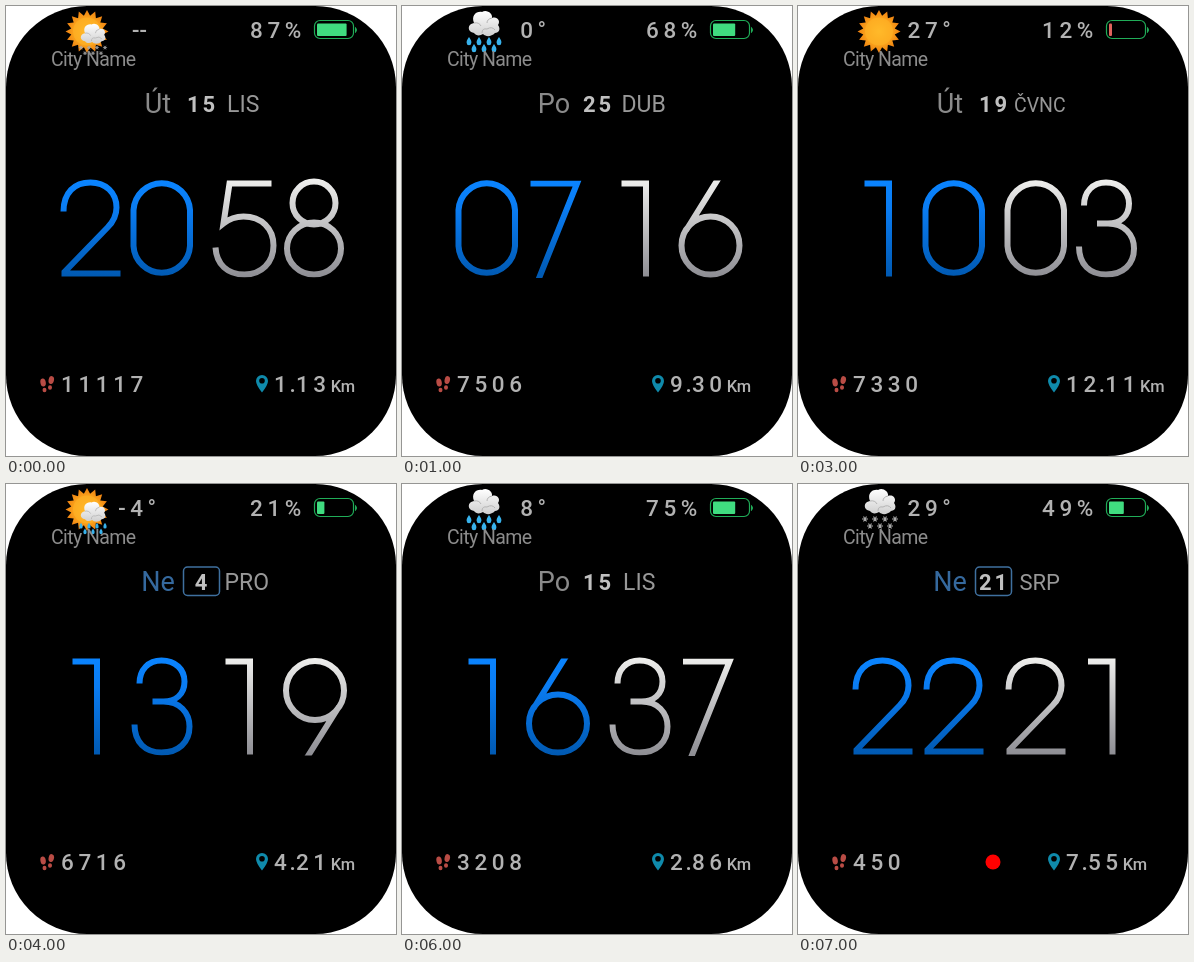
These frames come from a looping animation (390x450 px, 8000 ms). An HTML page:

```html
<!DOCTYPE html>
<html lang="cs">
<head>
<meta charset="utf-8">
<title>Watch face</title>
<style>
  html, body { margin: 0; width: 100%; height: 100%; overflow: hidden; background: #fff; }
  svg { display: block; width: 390px; height: 450px; font-family: Roboto, sans-serif; fill: #b2b2b2; }
  .num { font-size: 22.5px; font-weight: 500; letter-spacing: 4.6px; }
  .dot { letter-spacing: .2px; }
  .unit { font-size: 16.5px; letter-spacing: -.3px; }
  .mid { text-anchor: middle; }
  .city { font-size: 19.5px; letter-spacing: -.6px; fill: #8c8c8c; }
  .week { font-size: 27px; fill: #8a8a8a; }
  .day { font-size: 22px; font-weight: 700; letter-spacing: 3px; fill: #c0c0c0; }
  .month { fill: #989898; }
  .sunday { fill: #35699e; }
  .big { fill: none; stroke-width: 6; }
</style>
</head>
<body>
<svg viewBox="0 0 390 450">
  <defs>
    <linearGradient id="blue" gradientUnits="userSpaceOnUse" x1="0" y1="0" x2="0" y2="100">
      <stop stop-color="#0a84ff"/><stop offset=".3" stop-color="#0a7cf2"/><stop offset="1" stop-color="#0058b0"/>
    </linearGradient>
    <linearGradient id="white" gradientUnits="userSpaceOnUse" x1="0" y1="0" x2="0" y2="100">
      <stop stop-color="#f0f0ee"/><stop offset="1" stop-color="#8c8c92"/>
    </linearGradient>
    <radialGradient id="sunFill">
      <stop stop-color="#ffc02c"/><stop offset=".6" stop-color="#fba41c"/><stop offset="1" stop-color="#ee7f10"/>
    </radialGradient>
    <linearGradient id="cloudFill" x1="0" y1="0" x2="0" y2="1">
      <stop stop-color="#fff"/><stop offset="1" stop-color="#cfcfcf"/>
    </linearGradient>
    <clipPath id="trim"><rect x="-5" y="-1" width="75" height="100"/></clipPath>
    <clipPath id="flat"><rect x="-5" y="2" width="75" height="97.500"/></clipPath>
    <g id="cloud">
      <path d="M-10 9C-17 8-17 0-10-1C-13-8-8-13-2-12C3-15 9-10 8-6C13-8 17-3 14 1C17 5 15 9 11 9C7 13 2 13-1 10C-4 12-8 12-10 9Z" fill="url(#cloudFill)"/>
      <path d="M-10-1Q-5-2-3 2M8-6Q3-5 3-1M-2 9Q-2 4 3 5Q8 2 11 6" fill="none" stroke="#b4b4b4"/>
    </g>
    <path id="drop" d="M0-4Q3 0 2.300 2A2.300 2.300 0 0 1-2.300 2Q-3 0 0-4Z" fill="#38b2ec"/>
    <path id="flake" d="M-3 0H3M-1.500-2.600L1.500 2.600M1.500-2.600L-1.500 2.600" stroke="#a9a9a9" stroke-width="1.100"/>
  </defs>
  <rect width="390" height="450" rx="81" fill="#000"/>
  <g fill="#b94c45">
    <ellipse cx="37" cy="376.500" rx="2.700" ry="4" transform="rotate(-10 37 376)"/>
    <ellipse cx="38.500" cy="384" rx="2" ry="2.200"/>
    <ellipse cx="45.300" cy="374" rx="2.700" ry="4" transform="rotate(12 45 374)"/>
    <ellipse cx="44" cy="381.500" rx="2" ry="2.200"/>
  </g>
  <path d="M256 386.500Q250 379 250 375A6 6 0 0 1 262 375Q262 379 256 386.500ZM256 372A2.800 2.800 0 1 0 256 377.600A2.800 2.800 0 1 0 256 372Z" fill="#0f8aab" fill-rule="evenodd"/>
  <rect x="308.500" y="14.500" width="39" height="18" rx="5.500" fill="none" stroke="#20ad58" stroke-width="1.200"/>
  <path d="M349.500 21.500Q351.500 24 349.500 26.500Z" fill="#20ad58" stroke="#20ad58"/>
  <g id="face"></g>
  <text class="city" x="45" y="60">City Name</text>
</svg>
<script>
const STEP = 1000;

const glyphs = {
  0: 'M3 31.500A28.300 28.500 0 0 1 59.500 31.500V67.500A28.300 28.500 0 0 1 3 67.500Z',
  1: 'M13 5H37.500V98',
  2: 'M4 33C4 14 15 4 31 4C46 4 57 14 57 29C57 37 54 43 48 49L5 93.500V95H61',
  3: 'M9 27C9 13 18 4 31 4C45 4 54 13 54 25C54 38 45 45 33 45H22M33 45C49 45 59 56 59 70C59 86 48 96 31 96C15 96 4 86 4 68',
  5: 'M59 5H17L11 45C16 41 23 38 31 38C49 38 61 50 61 67C61 84 49 96 32 96C15 96 4 86 3 69',
  6: 'M40 -1L7 52M2.500 67A29 29 0 1 1 60.500 67A29 29 0 1 1 2.500 67',
  7: 'M4 5H50.500L12 101',
  8: 'M9.500 24.500A21 21 0 1 1 52.500 24.500A21 21 0 1 1 9.500 24.500M4 70A27 26 0 1 1 58 70A27 26 0 1 1 4 70',
  9: 'M24 101L56 50M3 34A29 29.500 0 1 1 61 34A29 29.500 0 1 1 3 34'
};
const slots = [53.5, 124.5, 206.5, 277];

// time, weekday, day, [month, x, size], temperature, battery, steps, distance, weather, link lost
const states = [
  ['2058', 'Út', 15, ['LIS', 221, 23], '--', 87, 11117, '1.13', 'sun snow'],
  ['0716', 'Po', 25, ['DUB', 219.5, 23], '0°', 68, 7506, '9.30', 'rain'],
  ['0852', 'St', 12, ['SRP', 221.5, 22], '16°', 35, 8264, '6.72', 'sun rain'],
  ['1003', 'Út', 19, ['ČVNC', 216, 19.5], '27°', 12, 7330, '12.11', 'sun'],
  ['1319', 'Ne', 4, ['PRO', 218.5, 23], '-4°', 21, 6716, '4.21', 'sun rain'],
  ['0111', 'Čt', 4, ['SRP', 221.5, 22], '19°', 62, 5922, '4.52', 'sleet', true],
  ['1637', 'Po', 15, ['LIS', 221, 23], '8°', 75, 3208, '2.86', 'rain'],
  ['2221', 'Ne', 21, ['SRP', 221.5, 22], '29°', 49, 450, '7.55', 'snow', true]
];

const text = (cls, x, y, s, extra = '') => `<text class="${cls}" x="${x}" y="${y}" ${extra}>${s}</text>`;
const use = (id, x, y, k = 1) => `<use href="#${id}" transform="translate(${x} ${y}) scale(${k})"/>`;

function sun() {
  const pts = Array.from({ length: 32 }, (_, i) => {
    const a = i * Math.PI / 16, r = i % 2 ? 16 : 21.5;
    return `${(81 + r * Math.sin(a)).toFixed(1)},${(25.5 - r * Math.cos(a)).toFixed(1)}`;
  });
  return `<polygon points="${pts.join(' ')}" fill="url(#sunFill)"/>` +
    '<circle cx="81" cy="25.5" r="14" fill="#ffb428" fill-opacity=".55"/>';
}

function weather(kind) {
  const sunny = kind.startsWith('sun'), fall = kind.split(' ').pop();
  let out = sunny ? sun() : '';
  if (fall === 'sun') return out;
  const [cx, cy, k] = sunny ? [87, 28, .8] : [82, 18, 1];
  for (let i = 0; i < 7; i++) {
    const low = i > 3;
    const x = cx + k * (low ? (i - 5) * 10 : (i - 1.5) * 10);
    const y = cy + k * (low ? 24 : 17);
    const id = fall === 'rain' || (fall === 'sleet' && i % 2 === 0) ? 'drop' : 'flake';
    out += use(id, x, y, sunny ? .7 : 1);
  }
  return out + use('cloud', cx, cy, k);
}

function draw([time, week, day, [month, mx, size], temp, power, steps, dist, sky, lost]) {
  const sunday = week === 'Ne';
  const digits = [...time].map((d, i) =>
    `<path class="big" transform="translate(${slots[i]} 172.5)" clip-path="url(#${d === '7' || d === '6' ? 'flat' : 'trim'})" ` +
    `stroke="url(#${i < 2 ? 'blue' : 'white'})" d="${glyphs[d]}"/>`);
  const km = dist.replace('.', '<tspan class="dot" dx="-2">.</tspan>') + '<tspan class="unit">Km</tspan>';
  const level = Math.max(3, 7.4 * Math.floor(power / 20));
  return weather(sky) +
    text('num mid', 133.5, 32, temp.replace('°', '<tspan dy="-1">°</tspan>'), temp === '--' ? 'style="letter-spacing:0"' : '') +
    text('num', 244, 32, power + '%') +
    `<rect x="311" y="17.500" width="${level}" height="12.500" rx="1" fill="${power < 15 ? '#e0635c' : '#40dc80'}"/>` +
    text('week mid' + (sunday ? ' sunday' : ''), 152, 107, week) +
    (sunday ? '<rect x="177.500" y="83" width="36" height="28.500" rx="4" fill="none" stroke="#3f709f" stroke-width="1.500"/>' : '') +
    text('day mid', 196.5, 106, day) +
    text('month', mx, 106, month, `font-size="${size}"`) +
    digits.join('') +
    text('num', 55, 386, steps) +
    text('num', 268, 386, km) +
    (lost ? '<circle cx="195" cy="378" r="7.500" fill="#f00"/>' : '');
}

const face = document.getElementById('face');
let shown = -1;
function tick() {
  const i = Math.floor(performance.now() / STEP) % states.length;
  if (i !== shown) face.innerHTML = draw(states[shown = i]);
  requestAnimationFrame(tick);
}
tick();
</script>
</body>
</html>
```
